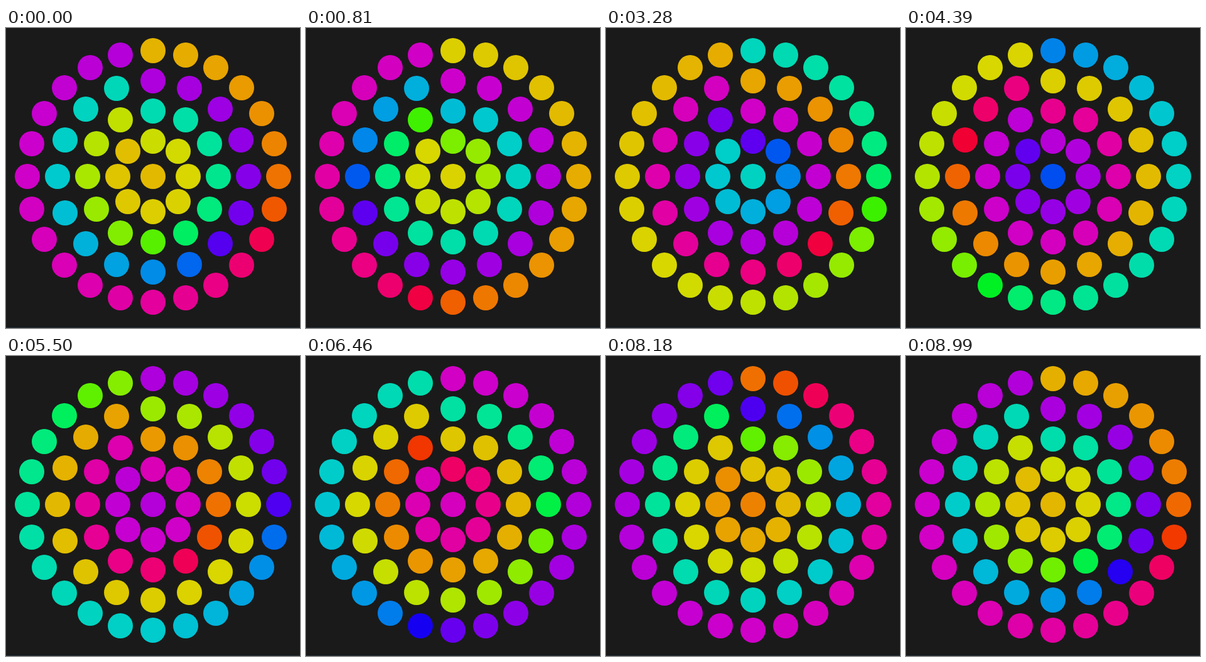
Animation of 468 by 477 pixels, one loop 9.06 s. Source, as an HTML page:

```html
<!DOCTYPE html>
<html lang="en">
<head>
<meta charset="utf-8">
<title>Colour spiral</title>
<style>
  html, body { margin: 0; width: 100%; height: 100%; overflow: hidden; background: #1a1a1a; }
  svg { display: block; width: 468px; height: 477px; }
</style>
</head>
<body>
<svg id="stage" viewBox="0 0 468 477">
  <rect y="476" width="468" height="1" fill="#25323a"/>
</svg>
<script>
  const LOOP = 9060, TICKS = 129, COUNT = 61, START = 52.4;
  const PEAK = 241;

  // Colour wheel stops, measured in dots along the spiral.
  // Even stops are pure primaries, odd stops are equal mixes at a given level.
  const stops = [0, 15, 22.9, 32.4, 38.1, 49.6, COUNT];
  const levels = [216, 204, 204];

  const stage = document.getElementById('stage');
  const dots = [];

  function addDot(radius, angle) {
    const dot = document.createElementNS('http://www.w3.org/2000/svg', 'circle');
    dot.setAttribute('cx', Math.round(234 + radius * Math.sin(angle)));
    dot.setAttribute('cy', Math.round(236 - radius * Math.cos(angle)));
    dot.setAttribute('r', 20);
    stage.append(dot);
    dots.push(dot);
  }

  // The spiral runs outwards from the centre, anticlockwise, each ring ending at the top.
  addDot(0, 0);
  [8, 12, 16, 24].forEach((n, ring) => {
    for (let i = 1; i <= n; i++) addDot(56 + 48 * ring, -2 * Math.PI * i / n);
  });

  function colour(pos) {
    const p = ((pos % COUNT) + COUNT) % COUNT;
    let s = 0;
    while (p >= stops[s + 1]) s++;
    const part = (p - stops[s]) / (stops[s + 1] - stops[s]);
    const side = s >> 1, rising = s % 2 === 0;
    const u = rising ? part : 1 - part;
    const major = PEAK + (levels[side] - PEAK) * u;
    const minor = levels[side] * Math.pow(u, 0.28);
    const rgb = [0, 0, 0];
    rgb[side] = Math.round(rising ? major : minor);
    rgb[(side + 1) % 3] = Math.round(rising ? minor : major);
    return `rgb(${rgb})`;
  }

  function draw(now) {
    const tick = Math.floor((now % LOOP + 20) * TICKS / LOOP);
    const shift = COUNT * tick / TICKS - START;
    dots.forEach((dot, i) => dot.setAttribute('fill', colour(i + shift)));
  }

  const begin = performance.now();
  function frame() {
    draw(performance.now() - begin);
    requestAnimationFrame(frame);
  }
  frame();
</script>
</body>
</html>
```
